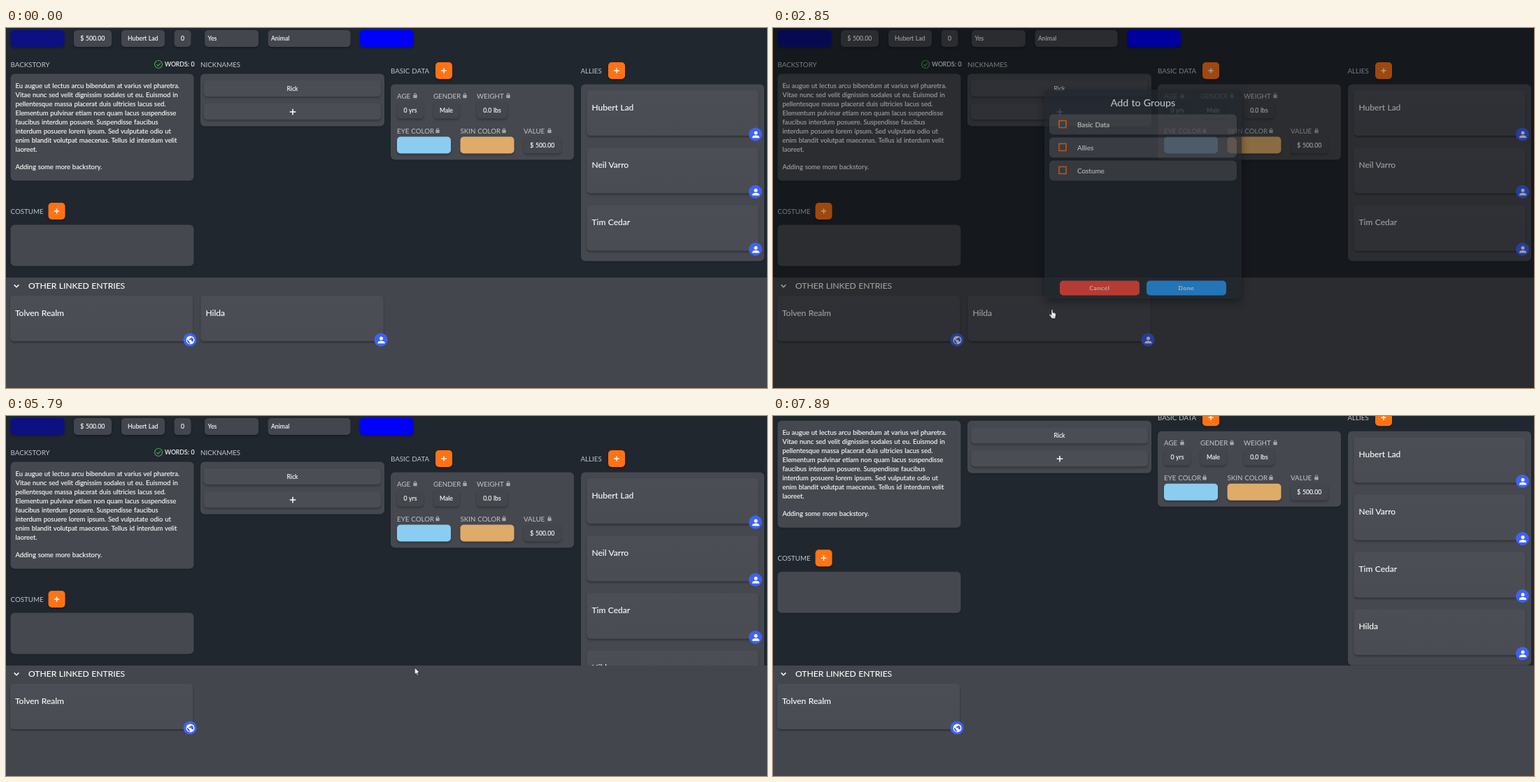
Write an HTML page that moves like this. It is 1088 by 515 pixels and loops after 7960 ms.

```html
<!DOCTYPE html>
<html lang="en">
<head>
<meta charset="utf-8">
<title>Add to group</title>
<style>
html, body { margin: 0; width: 100%; height: 100%; overflow: hidden; background: #21272f; }
#stage { position: relative; width: 1088px; height: 515px; overflow: hidden; color: #fff;
  font: 8.7px Lato, "Open Sans", sans-serif; word-spacing: .05em; }
#stage div, #stage svg { position: absolute; box-sizing: border-box; }
#stage svg { overflow: visible; }
.t { white-space: pre; line-height: 14px; margin-top: -7px; -webkit-text-stroke: .12px; }
.label { font-size: 9.75px; color: #c3c5c8; -webkit-text-stroke: 0; }
.name { font-size: 12px; }
.row-name { font-size: 9.9px; }
.item { font-size: 8.4px; letter-spacing: .78px; }
.body { font-size: 9.45px; line-height: 12.94px; white-space: pre; -webkit-text-stroke: .12px; }
.panel { background: #45484e; border-radius: 6px; box-shadow: 0 1px 2px #0003; }
.card { background: linear-gradient(#4c4e56, #4a4c53); border-radius: 5px; box-shadow: 0 2px 3px #0005; }
.chip { background: #43464d; border-radius: 5px; text-align: center; white-space: pre;
  box-shadow: 0 2px 3px #0004; -webkit-text-stroke: .12px; }
.field { text-align: left; padding-left: 4.5px; }
.plus { background: #ff7315; border-radius: 5px; box-shadow: 0 2px 3px #0004; }
.dot { border-radius: 50%; background: #3f62f5; }
.button { border-radius: 5px; overflow: hidden; text-align: center; font-size: 8.4px;
  letter-spacing: .7px; -webkit-text-stroke: .15px; }
.heading { text-align: center; font-size: 14.3px; -webkit-text-stroke: .12px; }
.glow { background: #fff2; }
.round { border-radius: 50%; }
#view { left: 0; top: 0; width: 1088px; height: 357px; overflow: hidden; }
#page { left: 0; top: 0; width: 1088px; height: 416px; }
#linked { left: 0; top: 357px; width: 1088px; height: 158px; background: #43474d; }
#dim { inset: 0; background: #000; opacity: 0; }
#dialog { left: 388px; top: 88px; width: 282px; height: 299px; border-radius: 6px;
  background: #212830; box-shadow: 0 5px 12px #0008; opacity: 0; }
#menu { left: 375px; top: 326px; width: 150px; height: 82.5px; border-radius: 5px; overflow: hidden;
  background: #363a41; box-shadow: 0 2px 5px #0006; }
#cursor { left: 0; top: 0; }
</style>
</head>
<body>
<div id="stage"></div>
<script>
const LOOP = 7960;
const ADDED = 5470;
const css = [];

// Registers keyframes given as [ms, declarations] and returns the style that runs them.
const anim = (name, steps, timing = 'linear') => {
  css.push(`@keyframes ${name}{${steps.map(([ms, d]) => `${(ms / LOOP * 100).toFixed(3)}%{${d}}`).join('')}}`);
  return `animation:${name} ${LOOP}ms ${timing} infinite`;
};
// Opaque only inside the given [from, to] windows.
const show = (name, ...spans) => {
  const steps = spans[0][0] > 0 ? [[0, 'opacity:0']] : [];
  for (const [from, to] of spans) {
    steps.push([from, 'opacity:1'], [to, `opacity:${to < LOOP ? 0 : 1}`]);
  }
  if (spans.at(-1)[1] < LOOP) steps.push([LOOP, 'opacity:0']);
  return anim(name, steps, 'step-end');
};

// Placed with translate, so that half pixels are kept.
const box = (x, y, w, h, cls, inner = '', style = '') =>
  `<div class="${cls}" style="left:0;top:0;translate:${x}px ${y}px;width:${w}px;height:${h}px;` +
  `line-height:${h}px;${style}">${inner}</div>`;
const text = (x, y, str, cls = '', style = '') =>
  `<div class="t ${cls}" style="left:${x}px;top:${y}px;${style}">${str}</div>`;
const icon = (x, y, shapes, style = '') =>
  `<svg width="1" height="1" style="left:${x}px;top:${y}px;${style}">${shapes}</svg>`;

const cross = (x, y, r) => icon(x, y,
  `<path d="M${-r} 0H${r}M0 ${-r}V${r}" stroke="#fff" stroke-width="1.5"/>`);
const lock = (x, y) => icon(x, y,
  '<rect x="-2.7" y="-1.2" width="5.4" height="4.4" rx=".7" fill="#a4a7ab"/>' +
  '<path d="M-1.5-1v-1a1.5 1.5 0 0 1 3 0v1" fill="none" stroke="#a4a7ab" stroke-width=".9"/>');
const plus = (x, y) => box(x, y, 23.5, 23.5, 'plus', cross(11.75, 11.75, 3.6));
const label = (x, y, str) => text(x, y, str, 'label');
const locked = (x, y, str, lockX) => label(x, y, str) + lock(lockX, y);

const dot = (x, y, shapes) => box(x - 9.5, y - 9.5, 19, 19, 'dot', icon(9.5, 9.5, shapes));
const person = '<circle cy="-2.5" r="2.5" fill="#fff"/><path d="M-5 4.8V3.5Q-4.6 1 0 1T5 3.5V4.8Z" fill="#fff"/>';
const globe = '<circle r="6" fill="#fff"/><path d="M-4.7-1.2L-1.4 2v1l1 1v1.2Q-5 4.2-4.7-1.2Z' +
  'M1.6-4.6V-3.6L.4-2.6H-.8v1.2H-2V-.2H1.6V1.6H2.8L3.8 2.6Q6-1.6 1.6-4.6Z" fill="#3f62f5"/>';
const entry = (x, y, w, name, shapes, dx) =>
  box(x, y, w, 65, 'card') + text(x + 7, y + 24.5, name, 'name') + dot(x + w + dx, y + 63, shapes);
const ally = (name, i) => entry(830.5, 89 + i * 82.2, 244.5, name, person, -3.5);
const group = (inner, style) => `<div style="left:0;top:0;${style}">${inner}</div>`;

const story = `Eu augue ut lectus arcu bibendum at varius vel pharetra.
Vitae nunc sed velit dignissim sodales ut eu. Euismod in
pellentesque massa placerat duis ultricies lacus sed.
Elementum pulvinar etiam non quam lacus suspendisse
faucibus interdum posuere. Suspendisse faucibus
interdum posuere lorem ipsum. Sed vulputate odio ut
enim blandit volutpat maecenas. Tellus id interdum velit
laoreet.

Adding some more backstory.`;

const page = [
  box(6.5, 3, 76.5, 23.5, 'chip', '', 'background:#0d1080'),
  box(97, 3, 53.5, 23.5, 'chip', '$ 500.00'),
  box(165, 3, 61.5, 23.5, 'chip', 'Hubert Lad'),
  box(240.5, 3, 24, 23.5, 'chip', '0'),
  box(284, 3, 76.5, 23.5, 'chip field', 'Yes'),
  box(374.5, 3, 117.5, 23.5, 'chip field', 'Animal'),
  box(506, 3, 76.5, 23.5, 'chip', '', 'background:#00f'),

  label(6.5, 52, 'BACKSTORY'),
  icon(217.5, 52, '<g fill="none" stroke="#43a84a" stroke-width="1.2"><circle r="5.5"/><path d="M-2.6.2L-.7 2.1 2.9-1.7"/></g>'),
  text(227, 52, 'WORDS: 0'),
  box(6.5, 65.5, 262, 152.5, 'panel'),
  `<div class="body" style="left:13.5px;top:77px">${story}</div>`,

  label(278, 51.5, 'NICKNAMES'),
  box(278, 65.5, 262.5, 75, 'panel'),
  box(283, 75, 253, 23, 'chip', 'Rick', 'background:#4b4d54'),
  box(283, 108, 253, 23, 'chip', cross(126.5, 11.5, 4.3), 'background:#4b4d54'),

  label(550, 60.5, 'BASIC DATA'), plus(614, 49),
  box(550, 80.5, 262, 108, 'panel'),
  locked(559, 96.5, 'AGE', 584.5), locked(611, 96.5, 'GENDER', 655.5), locked(673, 96.5, 'WEIGHT', 718),
  box(559, 105.5, 38, 23.5, 'chip', '0 yrs'),
  box(611, 105.5, 37, 23.5, 'chip', 'Male'),
  box(673, 105.5, 44, 23.5, 'chip', '0.0 lbs'),
  locked(559, 147, 'EYE COLOR', 617), locked(649.5, 147, 'SKIN COLOR', 712), locked(740, 147, 'VALUE', 776.5),
  box(559, 155.5, 77, 24, 'chip', '', 'background:#8acdf1'),
  box(649.5, 155.5, 77, 24, 'chip', '', 'background:#dfab69'),
  box(740, 155.5, 53.5, 24, 'chip', '$ 500.00'),

  label(821.5, 60.5, 'ALLIES'), plus(861, 49),
  box(822, 80.5, 262, 252.5, 'panel', '',
    anim('grow', [[0, 'height:252.5px'], [ADDED, 'height:334.7px'], [LOOP, 'height:334.7px']], 'step-end')),
  ...['Hubert Lad', 'Neil Varro', 'Tim Cedar'].map(ally),
  group(ally('Hilda', 3), show('joined', [ADDED, LOOP])),

  label(6.5, 262, 'COSTUME'), plus(60.5, 250),
  box(6.5, 281.5, 262, 59, 'panel'),
].join('');

const scroll = anim('scroll', [
  [0, 'transform:translateY(0)'],
  [6170, 'transform:translateY(0);animation-timing-function:steps(2)'],
  [6330, 'transform:translateY(-23.5px)'],
  [6400, 'transform:translateY(-23.5px);animation-timing-function:steps(5)'],
  [6800, 'transform:translateY(-58.8px)'],
  [LOOP, 'transform:translateY(-58.8px)'],
]);

const linked = [
  icon(14.5, 11.5, '<path d="M-3.3-1.6L0 1.7 3.3-1.6" fill="none" stroke="#fff" stroke-width="1.5"/>'),
  text(32, 11.5, 'OTHER LINKED ENTRIES', '', 'font-size:12.1px'),
  entry(6, 26, 261, 'Tolven Realm', globe, -4),
  group(entry(278.5, 26, 261, 'Hilda', person, -3.5), show('listed', [0, ADDED])),
].join('');

const menu = ['Edit Relationship', 'Open Entry', 'Unlink Entry from Rick Tolven', 'Add to Group']
  .map((s, i) => text(9, 10.6 + i * 20.6, s, 'item')).join('') +
  box(0, 62, 150, 20.5, '', '', 'background:#ffffff0e;' + show('pick', [2380, LOOP]));

const square = '<rect x="-5" y="-5" width="10" height="10" fill="none" stroke="#f97316" stroke-width="1.6"/>';
const tick = '<rect x="-5.8" y="-5.8" width="11.6" height="11.6" rx="1" fill="#f97316"/>' +
  '<path d="M-3.4.1L-1 2.5 3.6-2.3" fill="none" stroke="#fff" stroke-width="1.5"/>';
const option = (name, i) => box(7, 35.5 + i * 33, 268, 28.5, 'panel', icon(18.5, 14.2, square) +
  text(40, 14.2, name, 'row-name'), i === 1 ? 'background:#4a4d54' : '');

const ripple = anim('ripple', [
  [0, 'scale:0'], [5450, 'scale:0'], [5555, 'scale:1'], [5620, 'scale:1.5'], [LOOP, 'scale:0'],
]);
const dialog = [
  box(0, 8, 282, 21, 'heading', 'Add to Groups'),
  ...['Basic Data', 'Allies', 'Costume'].map(option),
  box(15.5, 72, 20, 20, 'round', '', 'background:#ffffff14;' + show('hover', [3950, 4330])),
  icon(25.5, 82.7, tick, show('checked', [4240, LOOP])),
  box(22, 273.5, 114, 20.5, 'button', 'Cancel' +
    box(0, 0, 114, 20.5, 'glow', '', show('overCancel', [3350, 3450])), 'background:#f44336'),
  box(146, 273.5, 114, 20.5, 'button', 'Done' +
    box(0, 0, 114, 20.5, '', '', 'background:#ffffff18;' + show('overDone', [5090, 5620])) +
    box(-29, -57, 122, 122, 'glow round', '', ripple), 'background:#2196f3'),
].join('');

const fade = (name, top) => anim(name, [
  [0, 'opacity:0'], [2690, 'opacity:0'], [2920, `opacity:${top}`],
  [5460, `opacity:${top}`], [5550, `opacity:${top * .68}`], [5620, 'opacity:0'], [LOOP, 'opacity:0'],
]);

const path = [
  [0, 990, 522], [140, 990, 522], [910, 375, 408.5], [2220, 375, 408.5], [2300, 377, 409],
  [2450, 399, 402.5], [3250, 399, 402.5], [4030, 415, 163.5], [4170, 415, 163.5], [5010, 562, 360],
  [5090, 566, 365], [5720, 566, 365], [6250, 860, 285], [6480, 860, 285], [6800, 863, 289],
  [6880, 863, 289], [7560, 1042, 517], [LOOP, 1042, 522],
];
const move = anim('move', path.map(([ms, x, y]) => [ms, `transform:translate(${x}px,${y}px)`]),
  'cubic-bezier(.4,.1,.6,.9)');
const arrow = '<path d="M0 0V9.8L2.2 7.7 3.7 11.2 5.4 10.5 3.9 7.1H6.9Z" fill="#fff" stroke="#000" stroke-width=".6"/>';
const hand = '<path d="M-1 1a1 1 0 0 1 2 0v3.6l3 .7q1.6.4 1.4 2L4.8 11v2H-1v-1.4L-4 8.2q-.6-1 .3-1.4.8-.2 1.5.6L-1 8.4Z" ' +
  'fill="#fff" stroke="#000" stroke-width=".6"/><path d="M1 9.2v2M2.7 9.2v2" stroke="#000" stroke-width=".4"/>';
const cursor =
  icon(0, 0, arrow, show('arrow', [0, 2380], [3450, 3880], [4330, 5090], [5620, LOOP])) +
  icon(0, 0, hand, show('hand', [2380, 3450], [3880, 4330], [5090, 5620]));

document.getElementById('stage').innerHTML = `
  <div id="view">
    <div id="page" style="${scroll}">${page}</div>
    ${box(1087, 217, 1, 140, '', '', 'background:#ffffff1c;' + show('bar', [6250, 7890]))}
  </div>
  <div id="linked">${linked}</div>
  ${box(367, 401, 15, 15, 'round', '', 'background:#ffffff1a;' + show('press', [1370, 1520]))}
  <div id="dim" style="${fade('dim', .54)}"></div>
  <div id="dialog" style="${fade('dialog', 1)}">${dialog}</div>
  <div id="menu" style="${show('menu', [1520, 2740])}">${menu}</div>
  <div id="cursor" style="${move}">${cursor}</div>`;

const sheet = document.createElement('style');
sheet.textContent = css.join('\n');
document.head.append(sheet);
</script>
</body>
</html>
```
